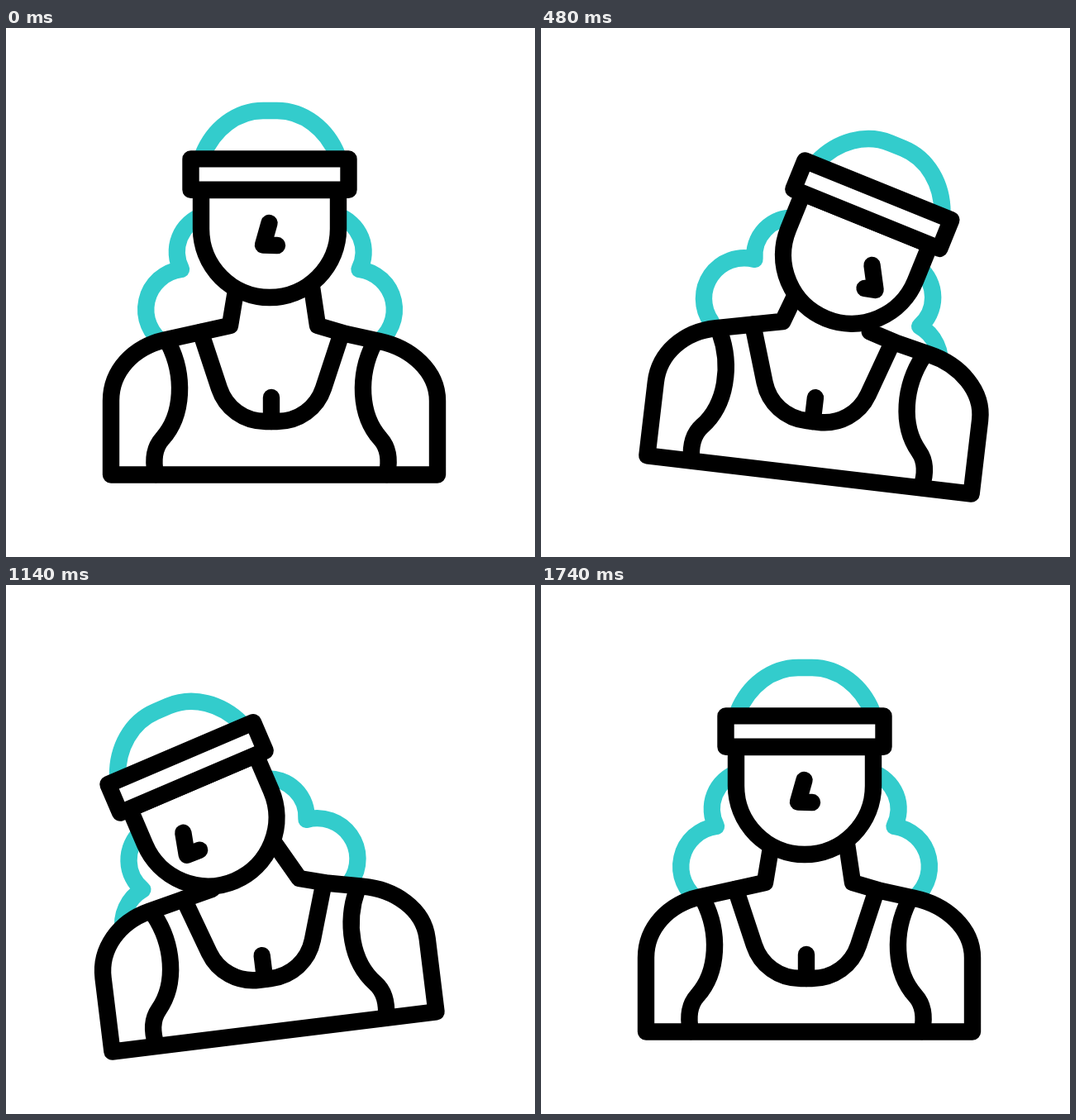
Animation of 640 by 640 pixels, one loop 2.4 s. Source, as an HTML page with a canvas:

```html
<!DOCTYPE html>
<html lang="en">
<head>
<meta charset="utf-8">
<title>Head tilt</title>
<style>
  html, body { margin: 0; width: 100%; height: 100%; overflow: hidden; background: #fff; }
  canvas { display: block; width: 640px; height: 640px; }
</style>
</head>
<body>
<canvas id="stage" width="640" height="640"></canvas>
<script>
const ctx = document.getElementById('stage').getContext('2d');
const LOOP = 2400, STEP = 20;
const INK = '#000', TEAL = '#33cccc';

// Poses: body and head angle (degrees), head shift, neck lean, nose points
const rest  = { body: 0,  head: 0,     x: 0,   y: 0,    lean: 0,   nose: [318.5, 236, 311, 262.5, 328, 263] };
const right = { body: 7,  head: 23.1,  x: 27,  y: 26.8, lean: 11,  nose: [347.5, 245.5, 363.6, 271.8, 349.4, 274.9] };
const left  = { body: -7, head: -23.2, x: -42, y: 31.8, lean: -23, nose: [284, 248, 277.5, 274.5, 294, 275] };

const moves = [
  { start: 52,   end: 607,  from: rest,  to: right },
  { start: 618,  end: 1165, from: right, to: left },
  { start: 1165, end: 1719, from: left,  to: rest }
];

const lerp = (a, b, k) => a + (b - a) * k;

// Cubic ease through (0.75, 0) and (0.25, 1)
function ease(u) {
  if (u <= 0) return 0;
  if (u >= 1) return 1;
  let lo = 0, hi = 1;
  for (let i = 0; i < 30; i++) {
    const s = (lo + hi) / 2, r = 1 - s;
    const x = 2.25 * r * r * s + 0.75 * r * s * s + s * s * s;
    if (x < u) lo = s; else hi = s;
  }
  return lo * lo * (3 - 2 * lo);
}

function poseAt(t) {
  let m = moves[0];
  for (const next of moves) if (t >= next.start) m = next;
  const k = ease((t - m.start) / (m.end - m.start));
  const mix = key => lerp(m.from[key], m.to[key], k);
  return {
    body: mix('body'), head: mix('head'), x: mix('x'), y: mix('y'), lean: mix('lean'),
    nose: m.from.nose.map((v, i) => lerp(v, m.to.nose[i], k))
  };
}

const hairTop = new Path2D('M238 154C251 122 279 100 311 100H328C360 100 388 122 401 154');
const hairLeft = new Path2D('M238 227A46.3 46.3 0 0 0 212 292A49 49 0 0 0 192 382');
const hairRight = new Path2D('M401 227A46.3 46.3 0 0 1 427.5 292A49 49 0 0 1 447 382');
const face = new Path2D('M236 196V243A83 83 0 0 0 402 243V196Z');
const band = new Path2D('M223.5 158.4H414.5V195.8H223.5Z');
const strapLeft = new Path2D('M197 382C216 420 215 468 189 497C180 507 177 520 181 540');
const strapRight = new Path2D('M445 382C426 420 427 468 453 497C462 507 465 520 461 540');
const neckline = new Path2D('M235.5 368L258 436C266 460 288 476 314 476H328C354 476 376 460 384 436L406 369');
const cleft = new Path2D('M321 447V476');

function torso(lean) {
  return new Path2D(`M${281 + lean} 300L271 360L192 377.5C154 386 127 415 127 451V540.5H522
    V451C522 415 490 387 452 379L411 370L377 360L${368 + lean} 300`);
}

function nose(p) {
  return new Path2D(`M${p[0]} ${p[1]}L${p[2]} ${p[3]}L${p[4]} ${p[5]}`);
}

function line(path, color = INK, filled = false) {
  if (filled) {
    ctx.fillStyle = '#fff';
    ctx.fill(path);
  }
  ctx.strokeStyle = color;
  ctx.stroke(path);
}

// Draw with a turn about (px, py) and a shift
function posed(px, py, deg, dx, dy, draw) {
  ctx.save();
  ctx.translate(px + dx, py + dy);
  ctx.rotate(deg * Math.PI / 180);
  ctx.translate(-px, -py);
  draw();
  ctx.restore();
}

function render(t) {
  const p = poseAt(t);
  const onHead = draw => posed(319, 326, p.head, p.x, p.y, draw);

  ctx.fillStyle = '#fff';
  ctx.fillRect(0, 0, 640, 640);
  ctx.lineWidth = 20.4;
  ctx.lineCap = ctx.lineJoin = 'round';

  onHead(() => [hairTop, hairLeft, hairRight].forEach(h => line(h, TEAL)));
  posed(324.5, 540.5, p.body, 0, 0, () => {
    line(torso(p.lean), INK, true);
    [strapLeft, strapRight, neckline, cleft].forEach(s => line(s));
  });
  onHead(() => {
    line(face, INK, true);
    line(band, INK, true);
    line(nose(p.nose));
  });
}

const begin = performance.now();
function tick() {
  const t = (performance.now() - begin) % LOOP;
  render(Math.floor(t / STEP) * STEP);
  requestAnimationFrame(tick);
}
tick();
</script>
</body>
</html>
```
